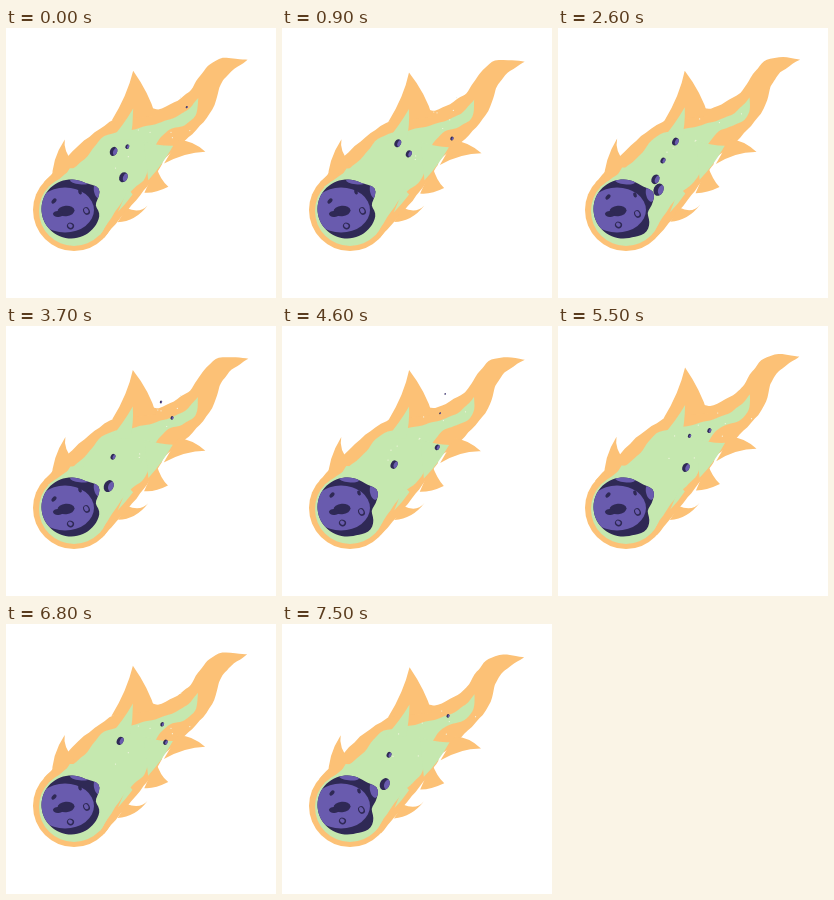
Recreate the animation shown at these times as an HTML page with a canvas. Size 270 by 270 pixels, loop 7600 ms.

```html
<!DOCTYPE html>
<html lang="en">
<head>
<meta charset="utf-8">
<title>Comet</title>
<style>
  html, body { margin: 0; width: 100%; height: 100%; overflow: hidden; background: #fff; }
  canvas { display: block; width: 100vw; height: 100vh; }
</style>
</head>
<body>
<canvas id="stage"></canvas>
<script>
const SIZE = 270, STEP = 100, COUNT = 76, TAU = Math.PI * 2;
const ORANGE = '#fcc176', GREEN = '#c5e8af', PURPLE = '#695bae', NAVY = '#2f2955';
const canvas = document.getElementById('stage');
const ctx = canvas.getContext('2d');

// Spines are a few knots of x, y and half width; licks are base, base, tip and bend.
const flame = {
  color: ORANGE,
  spine: [[68, 182, 41], [106, 140, 39], [138, 111, 31], [164, 99, 21],
          [192, 76, 15], [204, 53, 11], [217, 39, 9], [242, 32, 0]],
  licks: [
    [[46, 154], [68, 136], [59, 111], -7],
    [[106, 93], [150, 88], [127, 43], 5],
    [[172, 112], [158, 136], [199, 124], -6],
    [[150, 138], [138, 165], [162, 159], 4],
    [[121, 180], [112, 194], [142, 177], 8]
  ]
};
const core = {
  color: GREEN,
  spine: [[68, 183, 35], [99, 150, 28], [119, 129, 29], [138, 112, 14],
          [158, 99, 5.5], [176, 92, 5.5], [186, 84, 5], [192, 70, 0]],
  licks: [
    [[54, 156], [78, 140], [64, 140], 0],
    [[104, 112], [124, 112], [127, 80], 2],
    [[138, 113], [142, 152], [167, 118], 3],
    [[122, 160], [112, 184], [127, 166], 1]
  ]
};

// Chips leave the rock at an even rate per lane and shrink on the way.
const lanes = [
  { x: 92, y: 168, dx: 14.7, dy: -10.85, life: 6, r: 6.4, fade: .8, count: 14, lag: 3.7 },
  { x: 92, y: 156, dx: 14.7, dy: -12.75, life: 6.2, r: 4.9, fade: .8, count: 12, lag: .3 },
  { x: 98, y: 138.5, dx: 14.3, dy: -12.2, life: 4.3, r: 3.1, fade: .7, count: 14, lag: 3.8 },
  { x: 104, y: 127, dx: 14.7, dy: -14.7, life: 4.3, r: 4.6, fade: .88, count: 9, lag: 8.2 }
];

const hash = n => {
  const v = Math.sin(n * 127.1 + 11.7) * 43758.5453;
  return v - Math.floor(v);
};
const bell = (x, width) => Math.exp(-x * x / (width * width));

const spline = (a, b, c, d, t) => b + t / 2 * (c - a +
  t * (2 * a - 5 * b + 4 * c - d + t * (3 * (b - c) + d - a)));

function sample(knots, u) {
  const i = Math.min(Math.floor(u), knots.length - 2);
  const at = n => knots[Math.max(0, Math.min(knots.length - 1, n))];
  return [0, 1, 2].map(k =>
    spline(at(i - 1)[k], at(i)[k], at(i + 1)[k], at(i + 2)[k], u - i));
}

function ribbon(knots, warp) {
  const left = [], right = [], last = knots.length - 1, e = .01;
  for (let u = 0; u <= last + 1e-6; u += .125) {
    const [x, y, w] = sample(knots, u);
    const p = sample(knots, Math.max(0, u - e)), q = sample(knots, Math.min(last, u + e));
    const turn = Math.atan2(q[1] - p[1], q[0] - p[0]);
    const ox = Math.sin(turn) * w, oy = -Math.cos(turn) * w;
    left.push(warp(x + ox, y + oy));
    right.unshift(warp(x - ox, y - oy));
  }
  ctx.beginPath();
  for (const p of left.concat(right)) ctx.lineTo(...p);
  ctx.fill();
}

function lick(a, b, tip, bend, warp) {
  const mx = (a[0] + b[0]) / 2, my = (a[1] + b[1]) / 2;
  const len = Math.hypot(tip[0] - mx, tip[1] - my);
  const ox = -(tip[1] - my) / len * bend, oy = (tip[0] - mx) / len * bend;
  const mid = p => warp((p[0] + tip[0]) / 2 + ox, (p[1] + tip[1]) / 2 + oy);
  ctx.beginPath();
  ctx.moveTo(...warp(...a));
  ctx.quadraticCurveTo(...mid(a), ...warp(...tip));
  ctx.quadraticCurveTo(...mid(b), ...warp(...b));
  ctx.fill();
}

function oval(x, y, rx, ry, turn, color) {
  ctx.beginPath();
  ctx.ellipse(x, y, rx, ry, turn, 0, TAU);
  ctx.fillStyle = color;
  ctx.fill();
}

function ring(x, y, rx, ry, turn) {
  oval(x, y, rx, ry, turn, NAVY);
  oval(x - .2, y - .3, rx - 1.2, ry - 1.3, turn, PURPLE);
}

function drawFire({ color, spine, licks }, warp) {
  const [x, y, r] = spine[0];
  oval(x, y, r, r, 0, color);
  ribbon(spine, warp);
  for (const args of licks) lick(...args, warp);
}

function drawFlame(frame) {
  const swing = -Math.sin(frame / COUNT * 6 * TAU);
  const pose = frame % 4;
  const warp = (x, y) => {
    const far = Math.max(0, (x - y + 130) / 340);
    return [
      x + swing * .6 * far + .4 * Math.sin(x * .31 + y * .17 + pose * 1.6),
      y + swing * 2 * far + .4 * Math.cos(x * .23 - y * .29 + pose * 1.6)
    ];
  };
  drawFire(flame, warp);
  drawFire(core, warp);
  for (let i = 0; i < 8; i++) {
    const n = i + pose * 9, along = hash(n), side = hash(n + 50) - .5;
    oval(100 + along * 85 + side * 24, 142 - along * 62 + side * 30, .6, .6, 0, '#f4f5e2');
  }
}

function drawRock(frame) {
  const tilt = frame % 4 > 1 ? 1 : 0;
  ctx.save();
  ctx.beginPath();
  for (let a = -Math.PI; a < Math.PI; a += .1) {
    const r = 29.5 + 5 * bell(a + .65 - tilt * .15, .25)
      - 4.5 * bell(a + .15 - tilt * .3, .25) + tilt * 3 * bell(a - .8, .3);
    ctx.lineTo(65 + r * Math.cos(a), 181 + r * Math.sin(a));
  }
  ctx.closePath();
  ctx.fillStyle = NAVY;
  ctx.fill();
  ctx.clip();
  oval(59, 182, 29, 22.5, 0, PURPLE);
  oval(74 - tilt * 7, 153.5, 10, 2.8, .1, PURPLE);
  oval(92, 163 + tilt * 3, 4, 8, -.2, PURPLE);
  ctx.restore();

  oval(60, 183, 8.5, 5.2, -.08, NAVY);
  oval(52, 186, 5, 3, .05, NAVY);
  oval(48 + tilt * 2, 173 - tilt * 4, 3, 1.9, -.8, NAVY);
  oval(74 + tilt * 3, 164 + tilt * 3, 1.7, 2.6, -.35, NAVY);
  ring(80.5 - tilt, 183 + tilt * 3, 3.2, 4, -.5);
  ring(64.5 - tilt * 4, 198 - tilt, 3.6, 3.3, .5);
}

function drawChip(x, y, r) {
  ctx.save();
  ctx.translate(x, y);
  ctx.rotate(.45);
  ctx.beginPath();
  ctx.ellipse(0, 0, r * .82, r * 1.08, 0, 0, TAU);
  ctx.fillStyle = NAVY;
  ctx.fill();
  ctx.clip();
  oval(r * .62, -r * .2, r * .72, r * .95, 0, PURPLE);
  ctx.restore();
}

function drawChips(frame) {
  for (const p of lanes) {
    const gap = COUNT / p.count;
    const age = (frame - p.lag + COUNT) % gap;
    for (let t = age; t <= p.life; t += gap) {
      drawChip(p.x + p.dx * t, p.y + p.dy * t, p.r * (1 - p.fade * t / p.life));
    }
  }
}

function resize() {
  const ratio = window.devicePixelRatio || 1;
  canvas.width = Math.round(innerWidth * ratio);
  canvas.height = Math.round(innerHeight * ratio);
}

function draw(now) {
  const frame = Math.floor(now / STEP) % COUNT;
  ctx.setTransform(canvas.width / SIZE, 0, 0, canvas.height / SIZE, 0, 0);
  ctx.fillStyle = '#fff';
  ctx.fillRect(0, 0, SIZE, SIZE);
  drawFlame(frame);
  drawChips(frame);
  drawRock(frame);
}

const begin = performance.now();
function tick() {
  draw(performance.now() - begin);
  requestAnimationFrame(tick);
}

addEventListener('resize', resize);
resize();
tick();
</script>
</body>
</html>
```
